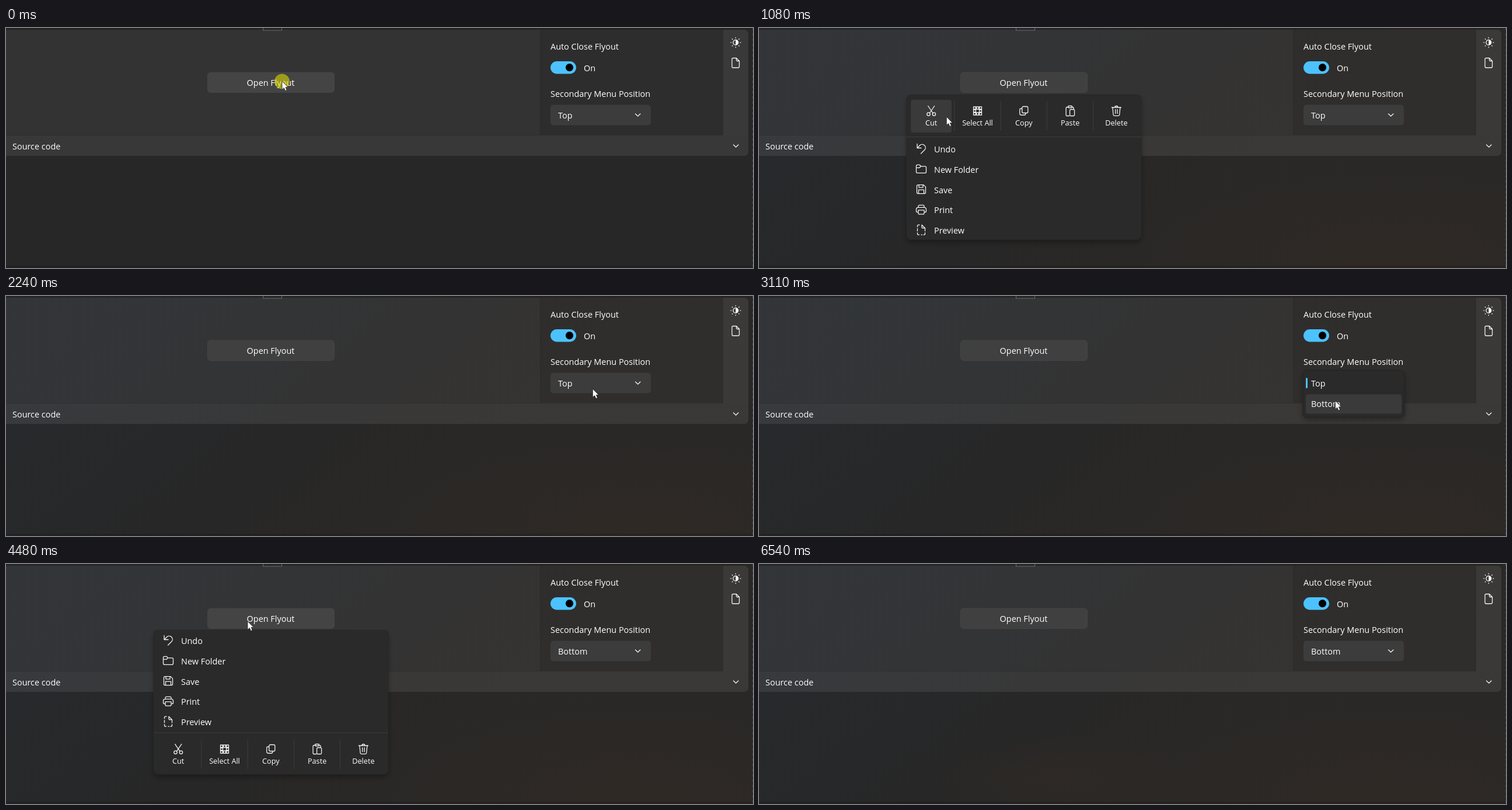
An HTML page for the animation above (6610 ms loop, 1280 by 411 pixels).

```html
<!DOCTYPE html>
<html lang="en">
<head>
<meta charset="utf-8">
<title>Flyout menu</title>
<style>
html, body { margin: 0; width: 100%; height: 100%; overflow: hidden; background: #272727; }
svg { display: block; width: 1280px; height: 411px; }
text { font: 14.45px "Open Sans", "Noto Sans", sans-serif; fill: #fff; white-space: pre; }
.small { font-size: 12.7px; text-anchor: middle; }
.mid { text-anchor: middle; }
.line { fill: none; stroke: #f2f2f2; stroke-width: 1.3; stroke-linecap: round; stroke-linejoin: round; }
</style>
</head>
<body>
<svg viewBox="0 0 1280 411">
  <defs>
    <linearGradient id="mica" gradientUnits="userSpaceOnUse" x1="200" y1="0" x2="560" y2="440">
      <stop offset="0" stop-color="#2a60b0" stop-opacity=".045"/>
      <stop offset=".5" stop-color="#2a60b0" stop-opacity=".012"/>
      <stop offset=".65" stop-color="#804010" stop-opacity="0"/>
      <stop offset="1" stop-color="#804010" stop-opacity=".035"/>
    </linearGradient>
    <radialGradient id="warm">
      <stop offset="0" stop-color="#804010" stop-opacity=".055"/>
      <stop offset="1" stop-color="#804010" stop-opacity="0"/>
    </radialGradient>
    <filter id="shadow" x="-10%" y="-10%" width="120%" height="125%">
      <feDropShadow dx="0" dy="5" stdDeviation="5" flood-color="#000" flood-opacity=".3"/>
    </filter>
    <clipPath id="below"><path d="M200 112.5h520v298.500h-520z"/></clipPath>
    <clipPath id="card"><path d="M0 3H1265a7 7 0 0 1 7 7V212a7 7 0 0 1-7 7H0z"/></clipPath>
  </defs>

  <rect width="1280" height="411" fill="#272727"/>
  <rect width="1280" height="2" fill="#222"/>
  <rect y="407" width="1280" height="4" fill="#212121"/>
  <path d="M1279.500 0V411" stroke="#464646" stroke-dasharray="4 5"/>
  <g clip-path="url(#card)">
    <rect y="3" width="915" height="180" fill="#333"/>
    <rect x="915" y="3" width="314" height="180" fill="#2d2d2d"/>
    <path d="M915.500 3V183" stroke="#282828"/>
    <rect x="1229" y="3" width="43" height="181" fill="#393939"/>
    <rect y="184" width="1272" height="35" fill="#383838"/>
    <path d="M0 183.500H1229" stroke="#2e2e2e"/>
  </g>
  <rect x="440.500" y="-8" width="32" height="12" fill="#252525" stroke="#6c6c6c"/>

  <g id="tint">
    <rect width="1280" height="411" fill="url(#mica)"/>
    <ellipse cx="1080" cy="400" rx="430" ry="150" fill="url(#warm)"/>
  </g>
  <ellipse id="glow" cx="500" cy="365" rx="240" ry="75" fill="url(#warm)"/>

  <rect id="button" x="345.500" y="76" width="217" height="34.500" rx="5" stroke="#454545"/>
  <text class="mid" x="453.500" y="99">Open Flyout</text>

  <text x="933" y="37">Auto Close Flyout</text>
  <rect x="933" y="57" width="44" height="21.500" rx="10.750" fill="#4cc2ff"/>
  <circle cx="965.500" cy="67.700" r="6.600" fill="#000"/>
  <text x="990" y="74">On</text>
  <text x="933" y="117.500">Secondary Menu Position</text>
  <rect x="933" y="131.500" width="172" height="35" rx="5" fill="#3c3c3c"/>
  <text id="choice" x="946" y="155"></text>
  <path class="line" d="M1078.500 147l4.200 4 4.200-4M1246.500 200l4.200 4 4.200-4"/>
  <text x="11" y="208">Source code</text>

  <g transform="translate(1250.300 24.800)">
    <circle class="line" r="4.400"/>
    <path d="M0-4.400a4.400 4.400 0 0 1 0 8.800z" fill="#fff"/>
    <g id="rays" class="line"></g>
  </g>
  <path class="line" d="M1246 51.500h5.500l5 5v9.500a2 2 0 0 1-2 2h-8.500a2 2 0 0 1-2-2v-12.500a2 2 0 0 1 2-2zM1251.500 51.500v3.500a1.500 1.500 0 0 0 1.500 1.500h3.500"/>

  <g clip-path="url(#below)">
    <g id="menu">
      <rect x="253" y="114.500" width="402" height="248" rx="8" fill="#2c2c2c" stroke="#262626" filter="url(#shadow)"/>
      <path id="rule" d="M253 0H655" stroke="#3d3d3d"/>
      <g id="row"></g>
      <g id="list"></g>
    </g>
  </g>

  <g id="popup">
    <rect x="932" y="127.500" width="174" height="80" rx="7" fill="#2c2c2c" stroke="#222" filter="url(#shadow)"/>
    <rect id="pick" x="937" width="164" height="33" rx="4" fill="#3a3a3a"/>
    <rect x="937" y="140" width="3" height="18" rx="1.500" fill="#4cc2ff"/>
    <text x="946" y="155">Top</text>
    <text x="946" y="190">Bottom</text>
  </g>

  <g id="pointer">
    <circle id="press" r="13" cy=".5" fill="#e3e000"/>
    <path d="M0 0V14.500L3.300 11.400 5.600 16.500 8.200 15.400 6 10.400H10.200z" fill="#fff" stroke="#222" stroke-width=".8"/>
  </g>
</svg>
<script>
const LOOP = 6610;
const $ = id => document.getElementById(id);
const set = (el, attrs) => { for (const k in attrs) el.setAttribute(k, attrs[k]); };
const clamp = v => Math.max(0, Math.min(1, v));
const ramp = (t, a, b) => clamp((t - a) / (b - a));
const move = (x, y) => `translate(${x} ${y})`;

// Icons are drawn around their own centre
const cells = '-7 -7,-2 -7,3 -7,-7 3,-2 3,3 3,-7 -2,3 -2'.split(',')
  .map(p => `M${p}h4v4h-4z`).join('');
const commands = [
  ['Cut', 'M-5.500-8.500L3 4M5.500-8.500L-3 4M-2 5.500a2.700 2.700 0 1 1-5.400 0 2.700 2.700 0 1 1 5.400 0M7.400 5.500a2.700 2.700 0 1 1-5.400 0 2.700 2.700 0 1 1 5.400 0'],
  ['Select All', cells],
  ['Copy', 'M-1-7.500h6a2 2 0 0 1 2 2v7a2 2 0 0 1-2 2h-6a2 2 0 0 1-2-2v-7a2 2 0 0 1 2-2zM-3-4h-2a2 2 0 0 0-2 2v6.500a2.500 2.500 0 0 0 2.500 2.500h5.500a2 2 0 0 0 2-2V3.500'],
  ['Paste', 'M-3-6.500h-2.500a1.500 1.500 0 0 0-1.500 1.500v12a1.500 1.500 0 0 0 1.500 1.500h4M3-6.500h1.500a1.500 1.500 0 0 1 1.500 1.500v2M-3-8.500h6v3h-6zM1-2.500h5a1.500 1.500 0 0 1 1.500 1.500v8a1.500 1.500 0 0 1-1.500 1.500h-5a1.500 1.500 0 0 1-1.500-1.500v-8a1.500 1.500 0 0 1 1.500-1.500z'],
  ['Delete', 'M-8-6h16M-2.500-6a2.500 2.500 0 0 1 5 0M-6.500-6l1.200 12.500a2 2 0 0 0 2 1.800h6.600a2 2 0 0 0 2-1.800L6.500-6M-1.700-2.500v7M1.700-2.500v7']
];
const items = [
  ['Undo', 'M-7-8v7h7M-6.500-1.500l4.500-4.500a5.700 5.700 0 0 1 8 8l-6.500 6.500'],
  ['New Folder', 'M-8.500-5a2 2 0 0 1 2-2h3.500l2.500 2.500h7a2 2 0 0 1 2 2v7.500a2 2 0 0 1-2 2h-13a2 2 0 0 1-2-2zM-8.500-2h5.500l2.500-2.500'],
  ['Save', 'M-5.500-7.500h9.500l3.500 3.500v9.500a2 2 0 0 1-2 2h-11a2 2 0 0 1-2-2v-11a2 2 0 0 1 2-2zM-4-7.500v4.500h7v-4.500M-4.500 7.500v-6.500h9v6.500'],
  ['Print', 'M-5-3.500v-2a2 2 0 0 1 2-2h6a2 2 0 0 1 2 2v2M-5 4.500h-1.500a2 2 0 0 1-2-2v-3a3 3 0 0 1 3-3h11a3 3 0 0 1 3 3v3a2 2 0 0 1-2 2h-1.500M-5 1h10v5a2 2 0 0 1-2 2h-6a2 2 0 0 1-2-2z'],
  ['Preview', 'M-3-8.500h-1.500a2 2 0 0 0-2 2v1.500M-6.500-2v4M-6.500 5v1.500a2 2 0 0 0 2 2h1M0 8.500h1.500M4 8.500h.500a2 2 0 0 0 2-2v-1.500M6.500 2v-5l-5.500-5.500v3.500a2 2 0 0 0 2 2h3.500']
];
const STEP = 79.3, PITCH = 34.8;

$('row').innerHTML = '<rect id="hover" y="-19" width="70" height="56" rx="4" fill="#3a3a3a"/>' +
  commands.map(([name, d], i) => {
    const x = 295.2 + i * STEP;
    const bar = i ? `<path d="M${x - 39.7}-17V34" stroke="#3d3d3d"/>` : '';
    return `${bar}<path class="line" transform="translate(${x} 0)" d="${d}"/><text class="small" x="${x}" y="25">${name}</text>`;
  }).join('');
$('list').innerHTML = items.map(([name, d], i) =>
  `<g transform="translate(0 ${i * PITCH})"><path class="line" transform="translate(278 -1.500)" d="${d}"/><text x="300" y="5">${name}</text></g>`
).join('');
$('rays').innerHTML = Array.from({ length: 8 }, (_, i) =>
  `<path transform="rotate(${i * 45})" d="M0-7.600v-.900"/>`).join('');

// Pointer path: time, x, y
const path = [
  [0, 473, 91], [590, 473, 91], [890, 310, 149], [1020, 310, 149], [1080, 321, 152],
  [1490, 628, 152], [1640, 628, 152], [2240, 1005, 159], [2320, 1022, 154],
  [2510, 1016, 150], [2880, 1016, 150], [3180, 983, 184], [3290, 983, 184],
  [3390, 976, 197], [3530, 976, 197], [3940, 414, 98], [4980, 414, 98],
  [5210, 520, 215], [5370, 571, 322], [5640, 297, 326.5], [5780, 271, 327],
  [5850, 300, 327], [5970, 470, 332], [6070, 657, 389], [6140, 720, 425], [LOOP, 720, 425]
];
const slope = (i, k) => (path[i + 1][k] - path[i][k]) / (path[i + 1][0] - path[i][0]);
function tangent(i, k) {
  if (i < 1 || i > path.length - 2) return 0;
  const a = slope(i - 1, k), b = slope(i, k);
  return a * b > 0 ? 2 * a * b / (a + b) : 0;
}
function along(t, k) {
  let i = 0;
  while (i < path.length - 2 && t >= path[i + 1][0]) i++;
  const [p, q] = [path[i], path[i + 1]], h = q[0] - p[0], u = (t - p[0]) / h;
  const s = u * u * (3 - 2 * u);
  return p[k] + (q[k] - p[k]) * s +
    h * u * (1 - u) * (tangent(i, k) * (1 - u) - tangent(i + 1, k) * u);
}

// Each press: down, release, gone
const presses = [[0, 70, 210], [2580, 2910, 3040], [3500, 3570, 3680], [4200, 4310, 4420]];
// Each menu: open, settled, close, commands at the bottom
const menus = [[70, 340, 2110, false], [4330, 4580, 6535, true]];

function draw(t) {
  const x = along(t, 1), y = along(t, 2);
  set($('pointer'), { transform: move(x, y) });
  const press = presses.find(p => t >= p[0] && t < p[2]);
  set($('press'), { opacity: press ? 0.57 * (1 - ramp(t, press[1], press[2])) : 0 });

  set($('tint'), { opacity: ramp(t, 60, 200) });
  set($('glow'), { opacity: t >= 6535 ? 1 : 0 });
  const over = x > 345 && x < 563 && y > 76 && y < 111;
  set($('button'), { fill: over && (t < 300 || t > 4000) ? '#444' : '#404040' });

  const m = menus.find(m => t >= m[0] && t < m[2]);
  $('menu').style.display = m ? '' : 'none';
  if (m) {
    const [open, settled, , flip] = m;
    const rest = 1 - ramp(t, open, settled);
    const rowY = flip ? 319.5 : 142;
    set($('menu'), { transform: move(0, -40 * rest ** 3), opacity: ramp(t, open - 20, open + 70) });
    set($('row'), { transform: move(0, rowY) });
    set($('list'), { transform: move(0, flip ? 134.5 : 208) });
    set($('rule'), { transform: move(0, flip ? 291.5 : 186.5) });
    const i = Math.floor((x - 260.2) / STEP);
    const hit = i >= 0 && i < 5 && x - 260.2 - i * STEP < 70 && y > rowY - 19 && y < rowY + 37;
    set($('hover'), { x: 260.2 + i * STEP, opacity: hit ? 1 : 0 });
  }

  set($('popup'), { opacity: ramp(t, 2900, 3030) * (1 - ramp(t, 3570, 3640)) });
  set($('pick'), { y: y > 167 ? 168.5 : 132.5 });
  $('choice').textContent = t < 3570 ? 'Top' : 'Bottom';
}

const start = performance.now();
function tick() {
  draw((performance.now() - start) % LOOP);
  requestAnimationFrame(tick);
}
draw(0);
requestAnimationFrame(tick);
</script>
</body>
</html>
```
